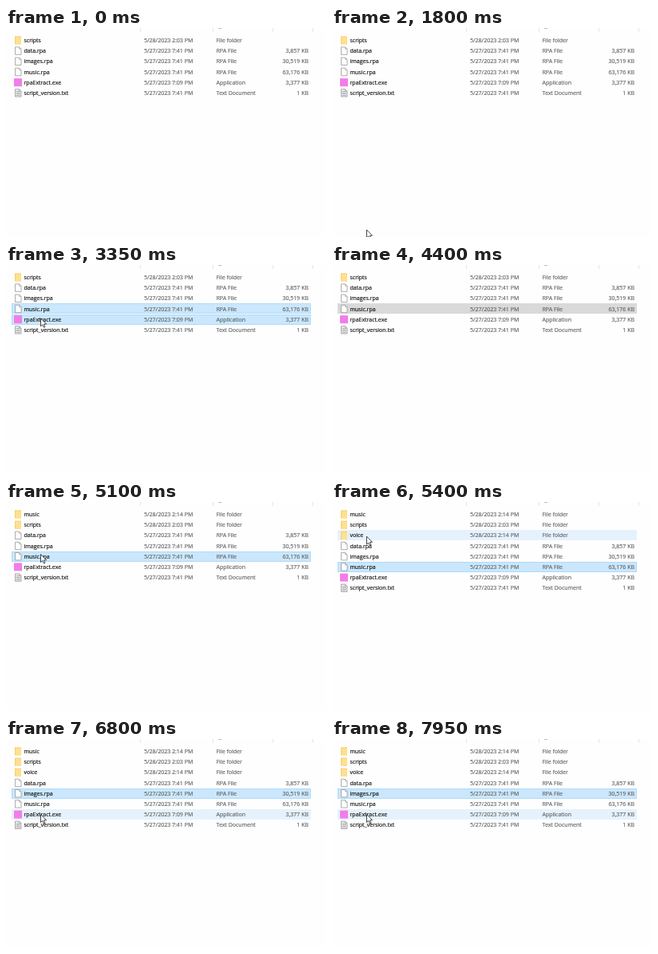
Animation, 401 px wide and 262 px high, one loop 8 s. Source, as an HTML page with a canvas:

```html
<!DOCTYPE html>
<html lang="en">
<head>
<meta charset="utf-8">
<title>File list</title>
<style>
html, body { margin: 0; width: 100%; height: 100%; overflow: hidden; background: #fefefe; }
canvas { display: block; width: 401px; height: 262px; }
</style>
</head>
<body>
<canvas id="stage" width="401" height="262"></canvas>
<script>
const canvas = document.getElementById('stage');
const ctx = canvas.getContext('2d');
const LOOP = 8000, STEP = 50;
const PITCH = 13.2, ROW_HEIGHT = 13;
const NAME = '#0c0c0c', DETAIL = '#606060';

const rowY = row => 15.4 + row * PITCH;
const within = (t, a, b) => t >= a && t < b;
const progress = (t, a, b) => Math.min(1, Math.max(0, (t - a) / (b - a)));
const easeInOut = k => k * k * (3 - 2 * k);

const folder = (name, time, from = 0) =>
  ({ name, date: '5/28/2023 ' + time, type: 'File folder', size: '', icon: 'folder', from });
const file = (name, size, type = 'RPA File', icon = 'page', time = '7:41 PM') =>
  ({ name, date: '5/27/2023 ' + time, type, size, icon, from: 0 });

const entries = [
  folder('music', '2:14 PM', 5050),
  folder('scripts', '2:03 PM'),
  folder('voice', '2:14 PM', 5200),
  file('data.rpa', '3,857 KB'),
  file('images.rpa', '30,519 KB'),
  file('music.rpa', '63,176 KB'),
  file('rpaExtract.exe', '3,377 KB', 'Application', 'app', '7:09 PM'),
  file('script_version.txt', '1 KB', 'Text Document', 'text')
];

// The pointer glides from row to row; fractions lie between rows.
const glides = [
  { from: 1800, to: 2300, row: 2.35 },
  { from: 2300, to: 2500, row: 2.9 },
  { from: 2800, to: 3200, row: 3.9 },
  { from: 5050, to: 5400, row: 2.1 },
  { from: 5400, to: 5850, row: 4 },
  { from: 6050, to: 6600, row: 6 }
];

// Everything that depends on the time.
function stateAt(t) {
  const firstDrag = within(t, 2800, 4000), secondDrag = within(t, 6050, 6750);
  const unfocused = within(t, 4200, 4600) || within(t, 6900, 7500);
  const selected = t < 2750 ? '' : t < 5950 ? 'music.rpa' : 'images.rpa';
  return { t, selected, unfocused, dragging: firstDrag || secondDrag, pointer: pointerAt(t, unfocused) };
}

function pointerAt(t, unfocused) {
  if (within(t, 750, 900)) {
    const k = progress(t, 750, 900);
    return { x: 13 + 12 * k, y: 235 - 24 * k };
  }
  if (t < 1800 || unfocused) return null;
  const row = glides.reduce(
    (at, g) => at + (g.row - at) * easeInOut(progress(t, g.from, g.to)), 18);
  return { x: 43.5, y: rowY(row) };
}

function rect(x, y, w, h, color) {
  ctx.fillStyle = color;
  ctx.fillRect(x, y, w, h);
}

function polygon(points, fill, stroke, width) {
  ctx.beginPath();
  points.forEach(([x, y]) => ctx.lineTo(x, y));
  ctx.closePath();
  ctx.fillStyle = fill;
  ctx.fill();
  ctx.strokeStyle = stroke;
  ctx.lineWidth = width;
  ctx.stroke();
}

function drawPage(y, fill) {
  const left = 11.5, right = 19, top = y - 4.7, bottom = y + 4.7, fold = 2.5;
  const corner = [[right - fold, top], [right, top + fold]];
  polygon([[left, top], ...corner, [right, bottom], [left, bottom]], fill, '#8c8c8c', 0.7);
  polygon([...corner, [right - fold, top + fold]], '#ddd', '#8c8c8c', 0.4);
}

const icons = {
  folder(y) {
    rect(11, y - 5, 8, 10, '#f5cf69');
    rect(12, y - 4, 7, 9, '#ffe08f');
  },
  app(y) {
    rect(10, y - 5, 10, 10, '#f27de8');
  },
  page(y) {
    drawPage(y, '#fff');
  },
  text(y) {
    drawPage(y, '#ececec');
    for (let i = 0; i < 4; i++) rect(12.7, y - 2.2 + i * 1.6, 5, 0.7, '#a0a0a0');
  }
};

function text(value, x, y, color, align = 'left') {
  ctx.fillStyle = ctx.strokeStyle = color;
  ctx.textAlign = align;
  ctx.lineWidth = 0.15;
  ctx.fillText(value, x, y + 2.6);
  ctx.strokeText(value, x, y + 2.6);
}

function highlight(y, fill, border = fill) {
  const top = Math.round(y - ROW_HEIGHT / 2);
  rect(7, top, 375, ROW_HEIGHT, border);
  rect(8, top + 1, 373, ROW_HEIGHT - 2, fill);
}

function drawRow(entry, y, state) {
  const { pointer, dragging, unfocused } = state;
  const selected = entry.name === state.selected;
  const hovered = pointer && Math.abs(pointer.y - y) < PITCH / 2;
  if (selected && unfocused) highlight(y, '#d9d9d9');
  else if (selected || hovered && dragging) highlight(y, '#cae7fd', '#b0dafa');
  else if (hovered) highlight(y, '#e5f2fd');

  icons[entry.icon](y);
  text(entry.name, 22.5, y, NAME);
  text(entry.date, 173, y, DETAIL);
  text(entry.type, 263.5, y, DETAIL);
  text(entry.size, 379, y, DETAIL, 'right');
}

function drawPointer({ x, y }) {
  const arrow = [[0, 0], [0, 10], [2.3, 7.9], [3.9, 11.4], [5.5, 10.7], [4, 7.3], [7, 7.2]];
  polygon(arrow.map(([dx, dy]) => [x + dx, y + dy]), '#fff', '#181818', 0.8);
}

function render(t) {
  const state = stateAt(t);
  rect(0, 0, canvas.width, canvas.height, '#fefefe');
  for (const x of [168, 259, 334, 384]) rect(x, 0, 1, 5, '#e6e6e6');
  rect(266, 0, 4, 1, '#bbb');

  ctx.font = '7px "Open Sans", sans-serif';
  entries.filter(e => t >= e.from).forEach((e, i) => drawRow(e, rowY(i), state));
  if (state.pointer) drawPointer(state.pointer);
}

const start = performance.now();
function tick() {
  const t = (performance.now() - start) % LOOP;
  render(Math.floor(t / STEP) * STEP);
  requestAnimationFrame(tick);
}
tick();
</script>
</body>
</html>
```
